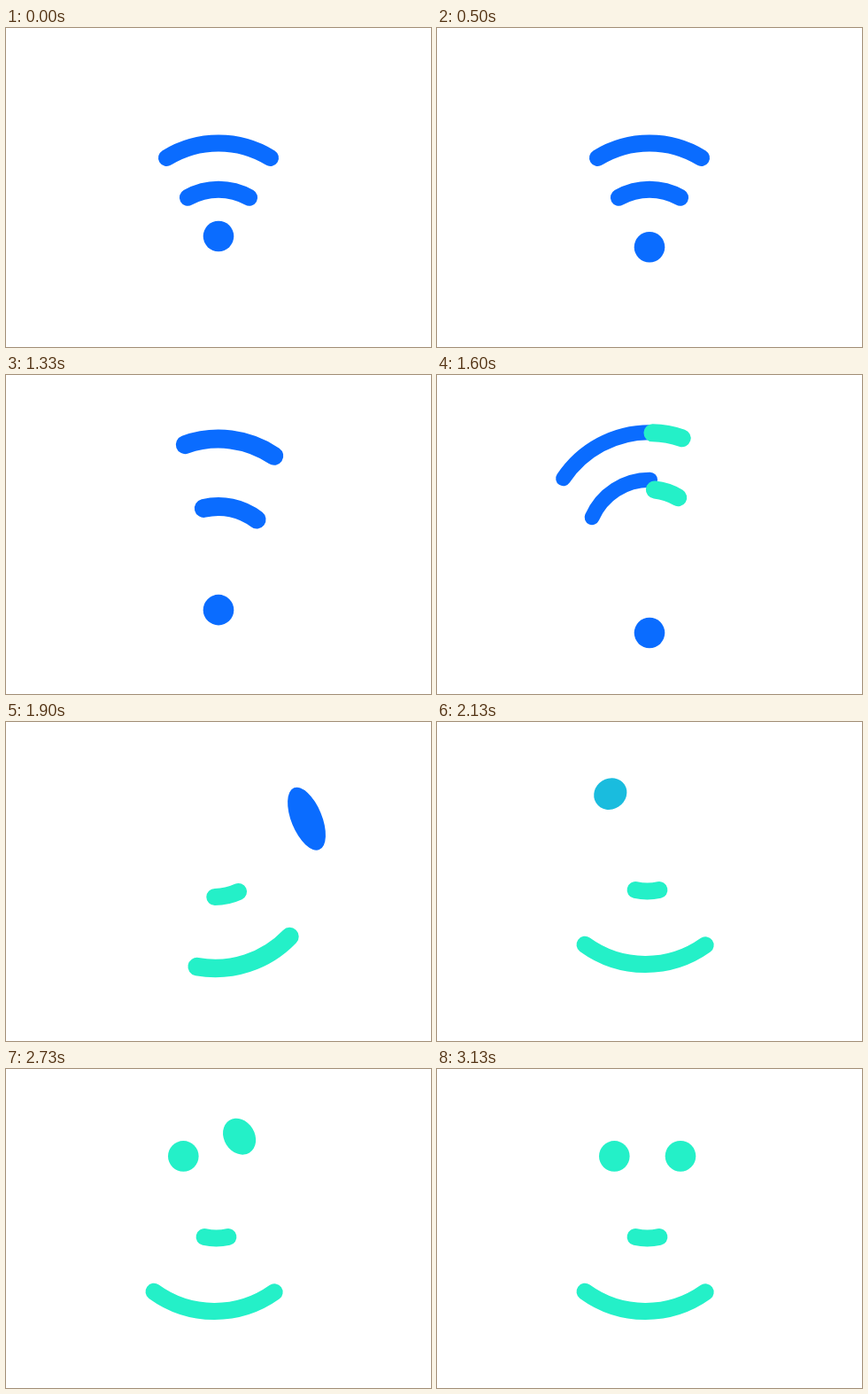
An HTML page with a canvas that plays this animation: 480 px wide and 360 px high, repeating every 3.53 s.

```html
<!DOCTYPE html>
<html lang="en">
<head>
<meta charset="utf-8">
<title>Signal to smile</title>
<style>
  html, body { margin: 0; height: 100%; overflow: hidden; background: #fff; }
  canvas { display: block; }
</style>
</head>
<body>
<canvas id="stage" width="480" height="360"></canvas>
<script>
const ctx = document.getElementById('stage').getContext('2d');
const LOOP = 3530, R = 17.3, FLOOR = 115.7;
const BLUE = [10, 108, 255], TEAL = [36, 240, 200];

// Key moments in ms.
const DROP = 330, RISE = 1030, SWING = 1345, ORBIT = 1600, GONE = 1810;
const LAND = 2190, HOP = 2323, HOP_END = 2803, BOUNCE = 330;

const rad = deg => deg * Math.PI / 180;
const rgb = c => `rgb(${c.map(Math.round)})`;
const mix = (a, b, u) => a + (b - a) * u;
const part = (t, from, to) => Math.min(1, Math.max(0, (t - from) / (to - from)));
const ease = (t, from, to) => {
  const u = part(t, from, to);
  return u * u * (3 - 2 * u);
};

// Angles are in degrees, clockwise from the top.
function arc(color, width, x, y, r, start, end) {
  ctx.strokeStyle = rgb(color);
  ctx.lineWidth = width;
  ctx.beginPath();
  ctx.arc(x, y, r, rad(start - 90), rad(end - 90));
  ctx.stroke();
}

function oval(x, y, rx, ry, angle, color) {
  ctx.fillStyle = rgb(color);
  ctx.beginPath();
  ctx.ellipse(x, y, rx, ry, angle, 0, 2 * Math.PI);
  ctx.fill();
}

// Each pair holds the value at rest and at the top of the jump.
const waves = [
  { y: [242, 183.7], drift: -2, r: 112, grow: 5, start: [-31.5, -19.6], end: [31.5, 34.1], power: [1.5, 2.4] },
  { y: [253, 219], drift: -30, r: 70.8, grow: 0, start: [-29.3, -13.5], end: [29.3, 37.5], power: [1, 2.3] }
];

// Waves jump, then whip round to the left and vanish.
function drawWave(w, t) {
  if (t >= GONE) return;
  const rise = ease(t, RISE, SWING), swing = ease(t, SWING, ORBIT);
  const whip = part(t, SWING, GONE);
  const turn = (pair, power) => mix(mix(...pair, rise), -110, whip ** power);
  const width = 19 + 2 * rise - 4 * swing - 12 * ease(t, ORBIT, GONE);
  arc(BLUE, width, 240, mix(...w.y, rise) + w.drift * swing, w.r + w.grow * swing,
    turn(w.start, w.power[0]), turn(w.end, w.power[1]));
}

// Each pair holds the value at the top and in the finished face.
const features = [
  { x: [240, 235.5], y: [182, 157], r: 116.5, start: [0, 144.5], end: [0, 216],
    lead: 0, settled: 2020, sway: { x: 0, r: 0, width: 2 } },
  { x: [240, 237.5], y: [192, 129], r: 62, start: [3.5, 167.5], end: [5, 192.5],
    lead: 28, settled: 1955, sway: { x: -3, r: 4, width: 0 } }
];

// Mouth and nose swing down the right side, front end first.
function drawFeature(f, t) {
  const begin = 1511 - f.lead;
  if (t < begin) return;
  const settle = ease(t, 1575, f.settled);
  const sway = Math.sin(Math.PI * part(t, ORBIT, 2000));
  const width = mix(20, 19, settle) * ease(t, begin - 60, ORBIT) + f.sway.width * sway;
  arc(TEAL, width, mix(...f.x, settle) + f.sway.x * sway, mix(...f.y, settle), f.r + f.sway.r * sway,
    mix(...f.start, ease(t, 1575, 1965)), mix(...f.end, ease(t, begin, 2007 - f.lead)));
}

// The dot drops, bobs, then flies round the right side, stretched along its path.
function drawDot(t) {
  const p = ease(t, ORBIT, LAND), angle = rad(219 * p);
  const radius = 85 + 50.5 * ease(t, DROP, 860) - 20.5 * ease(t, RISE, SWING)
    + 26 * ease(t, SWING, ORBIT) - 75 * p + 567 * p ** 6 * (1 - p);
  const tint = ease(t, 2050, LAND);
  oval(240 + radius * Math.sin(angle), 150 + radius * Math.cos(angle),
    R * (1 + 1.18 * Math.sin(Math.PI * p)), R, -angle,
    BLUE.map((c, i) => mix(c, TEAL[i], tint)));
}

// An eye that squashes and springs back, resting on the floor line.
function drawEye(x, t, hit) {
  const age = part(t, hit, hit + BOUNCE);
  const ry = R - 6.5 * Math.sin(2 * Math.PI * age) * Math.exp(-1.65 * age);
  oval(x, FLOOR - ry, R, ry, 0, TEAL);
}

function drawHop(t) {
  const q = part(t, HOP, HOP_END), climb = 1 - 2 * q;
  oval(200 + 75 * q, 98.4 - 172 * q * (1 - q), R * (1 + 0.35 * Math.abs(climb)), R,
    Math.atan2(-172 * climb, 75), TEAL);
}

function draw(t) {
  ctx.fillStyle = '#fff';
  ctx.fillRect(0, 0, 480, 360);
  ctx.lineCap = 'round';
  waves.forEach(w => drawWave(w, t));
  features.forEach(f => drawFeature(f, t));
  if (t < LAND) return drawDot(t);
  drawEye(200.3, t, HOP);
  if (t >= HOP_END) drawEye(275, t, HOP_END);
  else if (t >= HOP) drawHop(t);
}

let began;
function tick(now) {
  began ??= now;
  draw((now - began) % LOOP);
  requestAnimationFrame(tick);
}
requestAnimationFrame(tick);
</script>
</body>
</html>
```
